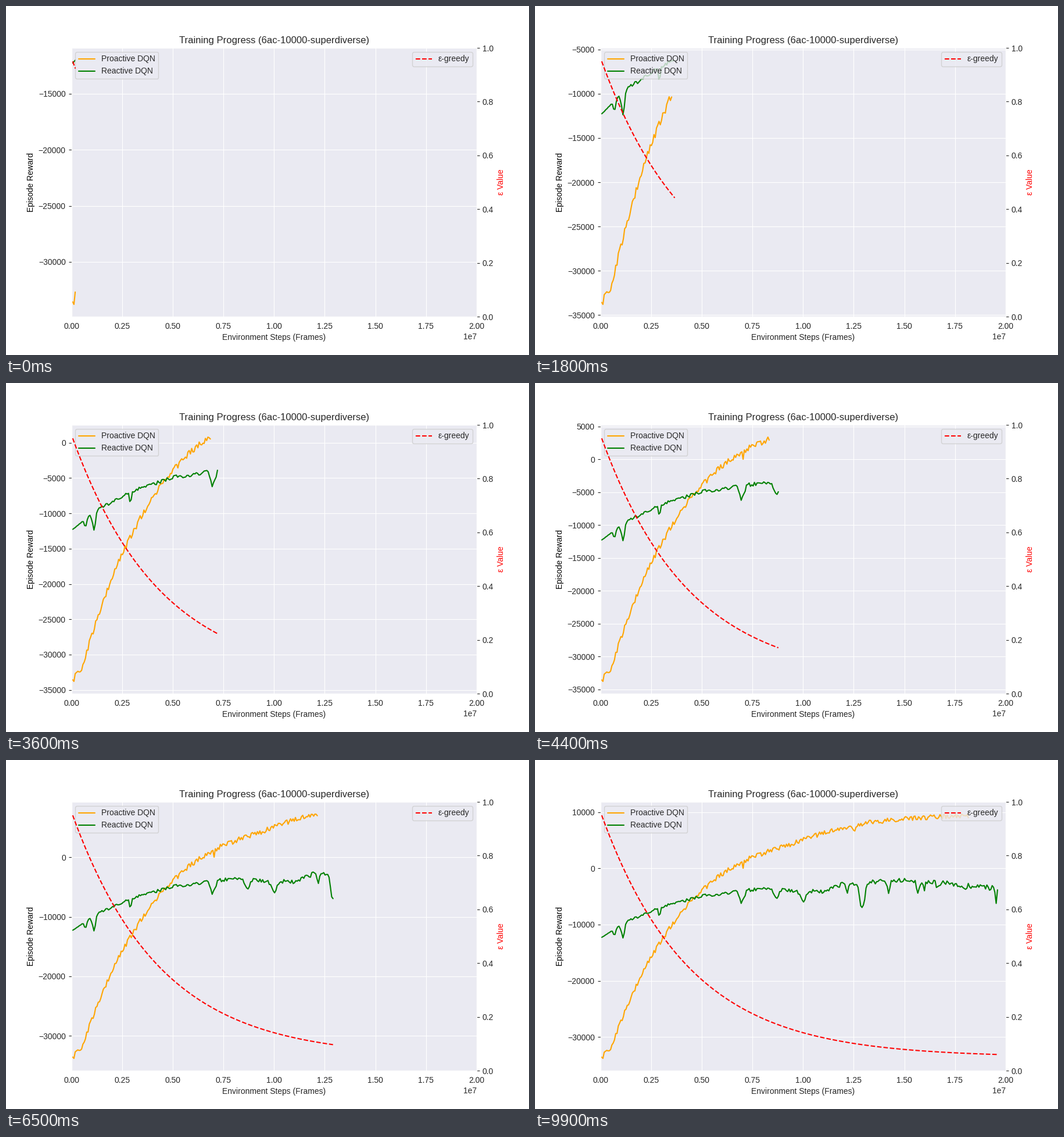
A matplotlib script that plays this animation: 900 px wide and 600 px high, repeating every 10000 ms.

```python
import numpy as np
import matplotlib.pyplot as plt
from matplotlib.animation import FuncAnimation

FRAMES = 100
POINTS = 299

plt.rcParams.update({
    "font.family": "Liberation Sans",
    "axes.facecolor": "#EAEAF2",
    "axes.edgecolor": "white",
    "axes.labelcolor": ".15",
    "axes.axisbelow": True,
    "axes.grid": True,
    "grid.color": "white",
    "grid.linestyle": "-",
    "text.color": ".15",
    "xtick.color": ".15",
    "ytick.color": ".15",
    "xtick.bottom": False,
    "lines.solid_capstyle": "round",
})

rng = np.random.default_rng(6)
count = np.arange(1, POINTS + 1)


def dip(x, center, depth, width):
    return -depth * np.exp(-((x - center) / width) ** 2)


def noise(x, size):
    """Seeded jitter that fades in over the first million steps."""
    return rng.uniform(-size, size, POINTS) * np.clip(x, 0, 1)


def proactive(x):
    """Saturating growth, in thousands, for x in millions of steps."""
    y = np.maximum(10 - 47.7 * np.exp(-x / 4.08), -32.5)
    y += dip(x, 0.1, 1.55, 0.06) + dip(x, 9.3, 0.9, 2.2)
    y += dip(x, 7.04, 0.9, 0.06) + dip(x, 12.5, 0.8, 0.2)
    return y + noise(x, 0.45)


def reactive(x):
    """Slow rise with sudden setbacks."""
    y = np.interp(x, [0, 1.4, 3, 5, 8, 11, 12, 15, 17, 19.7],
                  [-12.4, -9.3, -6.9, -4.9, -3.6, -4.2, -2.7, -2.1, -2.6, -3.6])
    setbacks = [(0.7, 0.9, 0.08), (1.12, 2.3, 0.1), (2.92, 1.9, 0.05),
                (6.98, 2, 0.15), (8.7, 1.8, 0.15), (10, 1.9, 0.2),
                (12.17, 1.8, 0.07), (12.92, 4.8, 0.17), (14.22, 2.2, 0.08),
                (15.67, 2.2, 0.08), (15.98, 2, 0.06), (16.62, 1.3, 0.07),
                (18, 1.2, 0.06), (19.54, 2.4, 0.05)]
    y += sum(dip(x, *s) for s in setbacks)
    return y + noise(x, 0.2 + 0.015 * x)


x_pro = count * (63300 - 8.6 * count)
x_re = count * 65536
y_pro = 1000 * proactive(x_pro / 1e6)
y_re = 1000 * reactive(x_re / 1e6)
epsilon = 0.05 + 0.9 * 0.985 ** (count - 1)

fig, ax = plt.subplots(figsize=(9, 6), dpi=100)
ax2 = ax.twinx()
ax2.grid(False)

pro, = ax.plot([], [], color="orange", label="Proactive DQN")
re, = ax.plot([], [], color="green", label="Reactive DQN")
eps, = ax2.plot([], [], "--", color="red", label="ε-greedy")

ax.set_title("Training Progress (6ac-10000-superdiverse)")
ax.set_xlabel("Environment Steps (Frames)")
ax.set_ylabel("Episode Reward", color="black")
ax2.set_ylabel("ε Value", color="red")
ax.set_xlim(0, 2e7)
ax2.set_ylim(0, 1)
ax.legend(loc="upper left")
ax2.legend(loc="upper right")


def update(i):
    n = 3 + i * (POINTS - 3) // (FRAMES - 1)
    pro.set_data(x_pro[:n], y_pro[:n])
    re.set_data(x_re[:n], y_re[:n])
    eps.set_data(x_re[:n], epsilon[:n])
    ax.relim()
    ax.autoscale_view(scalex=False)
    return pro, re, eps


anim = FuncAnimation(fig, update, frames=FRAMES, interval=100, repeat=True,
                     repeat_delay=0)
plt.show()
```
